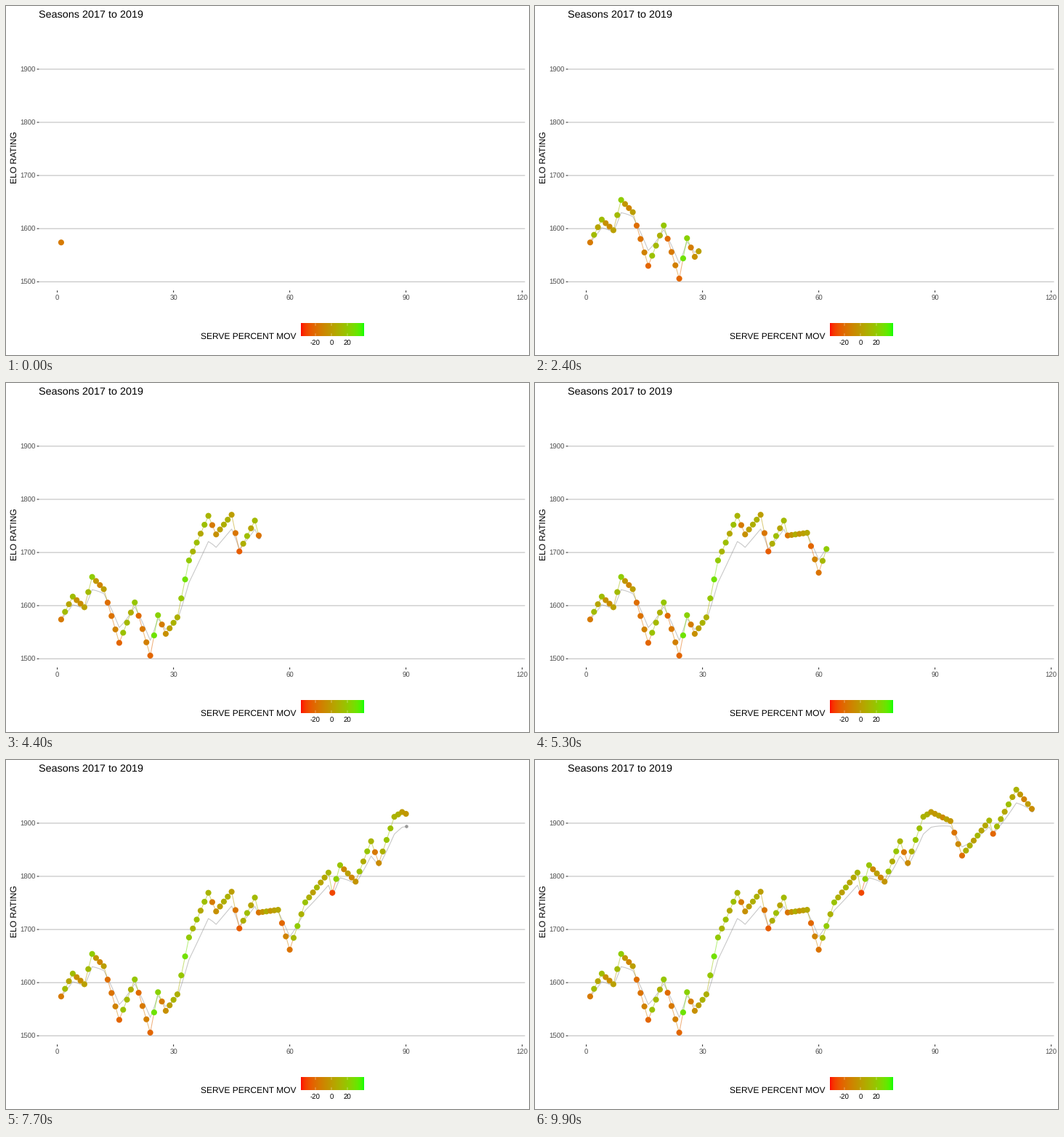
A matplotlib script for the animation above (10 s loop, 720 by 480 pixels).

```python
import numpy as np
import matplotlib.pyplot as plt
from matplotlib.animation import FuncAnimation
from matplotlib.collections import LineCollection

W, H, DPI = 720, 480, 80
PT = 72 / DPI  # points per pixel
FRAMES, INTERVAL = 100, 100
GAMES = 115

plt.rcParams["font.family"] = "Liberation Sans"
plt.rcParams["text.hinting"] = "none"

# (game, rating) at the turning points of the career
TURNS = [(1, 1574), (4, 1617), (7, 1597), (9, 1654), (12, 1631),
         (16, 1530), (20, 1606), (24, 1506), (26, 1582), (28, 1547),
         (31, 1578), (34, 1685), (39, 1769), (41, 1734), (45, 1771),
         (47, 1702), (51, 1760), (52, 1732), (57, 1737), (60, 1662),
         (64, 1751), (70, 1807), (71, 1769), (73, 1821), (77, 1790),
         (81, 1866), (83, 1825), (87, 1912), (89, 1921), (94, 1904),
         (97, 1839), (104, 1905), (105, 1880), (111, 1963), (115, 1927)]
START = 1597  # rating before the first game

LOW, HIGH = -38, 40
RED_LAB = np.array([53.24, 80.09, 67.20])
GREEN_LAB = np.array([87.73, -86.18, 83.18])
TO_RGB = np.array([[3.2406, -1.5372, -0.4986],
                   [-0.9689, 1.8758, 0.0415],
                   [0.0557, -0.2040, 1.0570]])


def damped(rating, gain=0.6, pull=0.12):
    """Follow the rating with smaller steps, drifting back to it."""
    out = [rating[0]]
    for prev, cur in zip(rating, rating[1:]):
        out.append(out[-1] + gain * (cur - prev) + pull * (prev - out[-1]))
    return np.array(out)


def margins(rating):
    """Serve margin: in line with the rating step, plus a wobble."""
    step = np.diff(rating, prepend=START)
    wobble = 6 * np.sin(2.4 * np.arange(len(rating)))
    return np.clip(0.65 * step + wobble, LOW, HIGH)


def ramp(t):
    """Red to green, blended in CIE Lab, a little darker midway."""
    t = np.asarray(t)[:, None]
    lab = RED_LAB + t * (GREEN_LAB - RED_LAB)
    fy = (lab[:, 0] + 16) / 116
    f = np.stack([fy + lab[:, 1] / 500, fy, fy - lab[:, 2] / 200], axis=1)
    xyz = np.where(f > 6 / 29, f ** 3, 3 * (6 / 29) ** 2 * (f - 4 / 29))
    rgb = np.clip(xyz * [0.9505, 1, 1.089] @ TO_RGB.T, 0, 1)
    gamma = 1.055 * np.maximum(rgb, 0.0031308) ** (1 / 2.4) - 0.055
    rgb = np.where(rgb <= 0.0031308, 12.92 * rgb, gamma)
    return rgb * (1 - 0.28 * t * (1 - t))


def px(n):
    return 70.6 + 5.3335 * n


def py(rating):
    return 379.3 - 0.731 * (rating - 1500)


fig = plt.figure(figsize=(W / DPI, H / DPI), dpi=DPI, facecolor="white")
ax = fig.add_axes([0, 0, 1, 1])


def text(x, y, s, size, color="black", **kw):
    ax.text(x, y, s, fontsize=size * PT, color=color, va="baseline", **kw)


def line(xs, ys, color, width=1.07, **kw):
    ax.plot(xs, ys, color=color, lw=width * PT, snap=False,
            solid_capstyle="butt", **kw)


def draw_axes():
    text(45.3, 16.3, "Seasons 2017 to 2019", 14.4)
    text(14.6, 208.3, "ELO RATING", 12, rotation=90, ha="center",
         rotation_mode="anchor")
    for r in range(1500, 2000, 100):
        y = py(r)
        line([45.4, 714.5], [y, y], "#bebebe")
        line([42.6, 45.4], [y, y], "#333333")
        text(41, y + 3.9, str(r), 9.6, "#4d4d4d", ha="right")
    for n in range(0, 121, 30):
        x = px(n)
        line([x, x], [391.3, 394], "#333333")
        text(x, 404.5, str(n), 9.6, "#4d4d4d", ha="center")


def draw_legend():
    left, right, top, bottom = 406, 492.4, 436.4, 453.7
    text(267.7, 458, "SERVE PERCENT MOV", 12)
    bar = ramp(np.linspace(0, 1, 300))[None]
    ax.imshow(bar, extent=(left, right, bottom, top), aspect="auto")
    for v in (-20, 0, 20):
        x = 448 + 1.1 * v
        for y in (top, bottom - 3.4):
            line([x, x], [y, y + 3.4], "white", 0.6, alpha=0.7, zorder=3)
        text(x, 467, str(v), 9.6, ha="center")


draw_axes()
draw_legend()
ax.set(xlim=(0, W), ylim=(H, 0))
ax.axis("off")

games = np.arange(1, GAMES + 1)
rating = np.interp(games, *zip(*TURNS))
X, Y, BASE = px(games), py(rating), py(damped(rating))
POINTS = np.column_stack([X, Y])
SEGMENTS = np.stack([POINTS[:-1], POINTS[1:]], axis=1)
COLORS = ramp((margins(rating) - LOW) / (HIGH - LOW))

base_line, = ax.plot([], [], color="#999999", alpha=0.55, lw=1.07 * PT,
                     zorder=4)
trail = LineCollection([], colors=COLORS, linewidths=1.07 * PT, alpha=0.5,
                       zorder=5)
ax.add_collection(trail, autolim=False)
base_dot, = ax.plot([], [], "o", color="#999999", ms=4.6 * PT, mew=0,
                    zorder=6)
dots = ax.scatter(X, Y, s=(8.1 * PT) ** 2, c=COLORS, linewidths=0, zorder=7)


def update(i):
    n = round(1 + i * (GAMES - 1) / (FRAMES - 1))
    base_line.set_data(X[:n], BASE[:n])
    base_dot.set_data(X[n - 1:n], BASE[n - 1:n])
    trail.set_segments(SEGMENTS[:n - 1])
    dots.set_offsets(POINTS[:n])
    return base_line, base_dot, trail, dots


anim = FuncAnimation(fig, update, frames=FRAMES, interval=INTERVAL,
                     init_func=lambda: update(0), repeat=True,
                     repeat_delay=0, blit=False)
plt.show()
```
